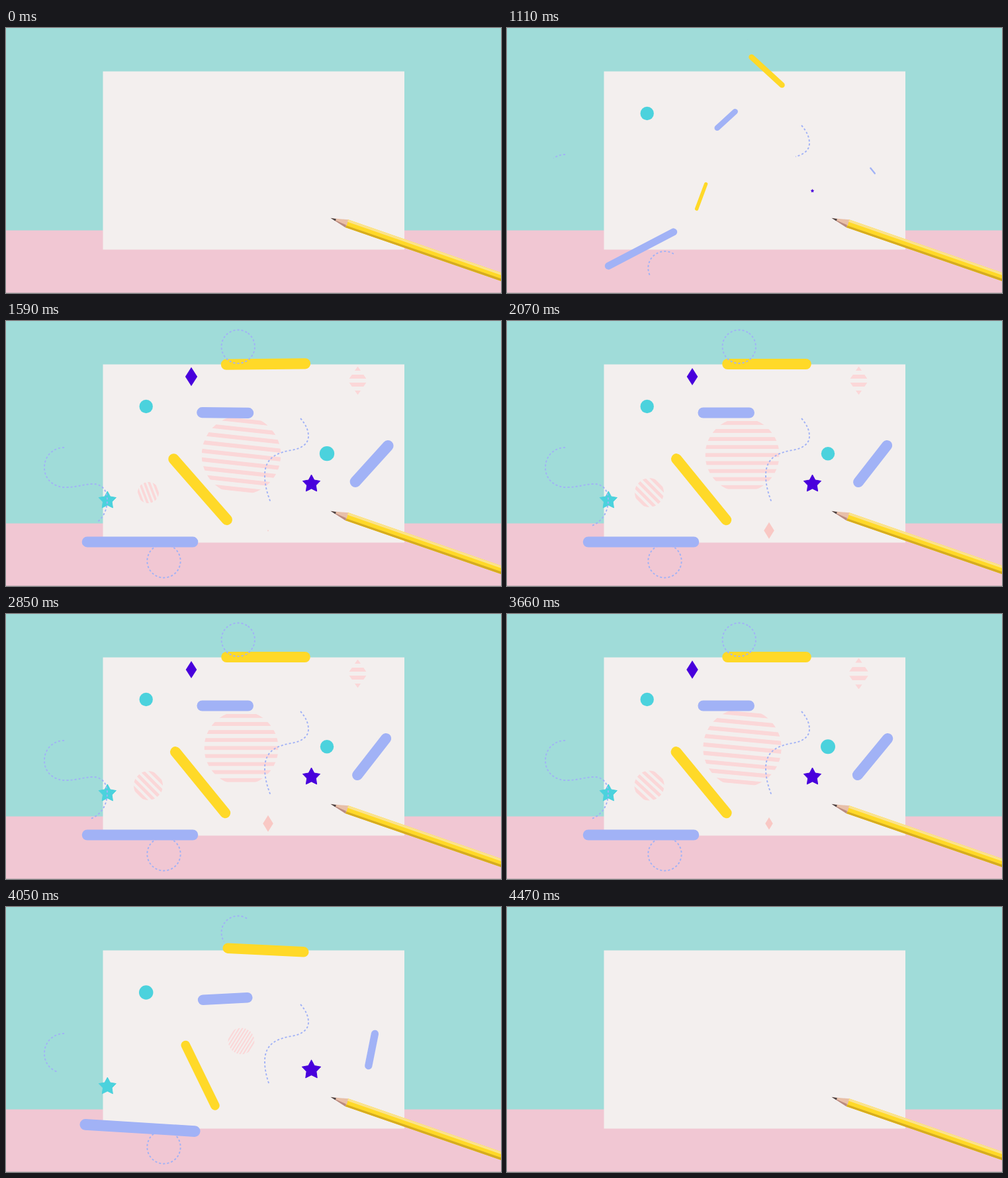
An HTML page that plays this animation: 748 px wide and 400 px high, repeating every 4.65 s.

```html
<!DOCTYPE html>
<html lang="en">
<head>
<meta charset="utf-8">
<title>Paper and pencil</title>
<style>
  html, body { margin: 0; width: 100%; height: 100%; overflow: hidden; }
  svg { display: block; width: 100vw; height: 100vh; }
</style>
</head>
<body>
<svg viewBox="0 0 748 400" preserveAspectRatio="none">
  <rect width="748" height="400" fill="#a0dcd9"/>
  <rect y="305.5" width="748" height="94.5" fill="#f1c7d3"/>
  <rect y="399" width="748" height="1" fill="#cdb4bc"/>
  <rect x="146.5" y="65.5" width="455.5" height="269" fill="#f3efee"/>
  <g id="confetti"></g>
  <g id="pencil">
    <path d="M516.5 289L748 369.3V382L512.8 301Z" fill="#ffd928"/>
    <path d="M516.5 289L748 369.3V373L515.6 292.5Z" fill="#fbe38c"/>
    <path d="M513.8 298L748 378.3V382L512.8 301Z" fill="#d6ac20"/>
    <path d="M491 287L517 289.3L515.5 296L512.8 301Z" fill="#e8bfa8"/>
    <path d="M491 287L514 297.6L512.8 301Z" fill="#b98a80"/>
    <path d="M490.5 286.8L499 288.2L497.5 291.3Z" fill="#494244"/>
  </g>
</svg>
<script>
const LOOP = 4650, STEP = 30, MIRROR = 5325;
const BLUE = '#a1b2f6', YELLOW = '#ffd928', TEAL = '#4bd2dd', PURPLE = '#4800dc', PINK = '#fbd7d8', CORAL = '#f9c8c4';

const root = document.getElementById('confetti');
const parts = [];
const clamp = v => Math.min(1, Math.max(0, v));

// Easings take the milliseconds since a part began.
function swing(ms) {
  if (ms <= 0) return 0;
  if (ms < 440) return 1.07 * Math.sin(Math.PI / 2 * ms / 440) ** 1.15;
  return 1 + 0.07 * Math.cos(Math.PI / 2 * clamp((ms - 440) / 320)) ** 4;
}
function pop(ms) {
  const u = clamp(ms / 400) - 1;
  return 1 + 2.70158 * u ** 3 + 1.70158 * u * u;
}
const smooth = x => (1 - Math.cos(Math.PI * clamp(x))) / 2;

function add(tag, attrs, parent = root) {
  const el = document.createElementNS('http://www.w3.org/2000/svg', tag);
  for (const key in attrs) el.setAttribute(key, attrs[key]);
  parent.appendChild(el);
  return el;
}

// A part grows from its centre and turns by `spin` degrees on the way.
function grow(x, y, start, ease, angle = 0, spin = 0) {
  const el = add('g', {});
  parts.push(t => {
    const s = ease(t - start);
    el.setAttribute('display', s > 0.005 ? 'inline' : 'none');
    el.setAttribute('transform', `translate(${x} ${y}) rotate(${angle + spin * (1 - s)}) scale(${s})`);
  });
  return el;
}

function bar(x, y, length, color, start, angle, spin) {
  add('rect', { x: -length / 2, y: -8, width: length, height: 16, rx: 8, fill: color },
    grow(x, y, start, swing, angle, spin));
}

function dot(x, y, r, start) {
  add('circle', { r, fill: TEAL }, grow(x, y, start, pop));
}

const rhombus = (w, h) => `M0 ${-h}L${w} 0L0 ${h}L${-w} 0Z`;

function diamond(x, y, w, h, color, start) {
  add('path', { d: rhombus(w, h), fill: color }, grow(x, y, start, pop));
}

function star(x, y, color, start) {
  const points = Array.from({ length: 10 }, (_, i) => {
    const r = i % 2 ? 7.2 : 13.8, a = i * Math.PI / 5;
    return [r * Math.sin(a), -r * Math.cos(a)];
  });
  add('polygon', { points: points.join(' '), fill: color, stroke: color, 'stroke-width': 1, 'stroke-linejoin': 'round' },
    grow(x, y, start, pop));
}

function stripes(group, id, outline, count, gap, thick) {
  const clip = add('clipPath', { id }, group);
  add('path', { d: outline }, clip);
  const lines = add('g', { 'clip-path': `url(#${id})`, fill: PINK }, group);
  for (let i = 0; i < count; i++) {
    const y = (i - (count - 1) / 2) * gap - thick / 2;
    add('rect', { x: -70, y, width: 140, height: thick }, lines);
  }
}
const disc = r => `M${-r} 0A${r} ${r} 0 0 1 ${r} 0A${r} ${r} 0 0 1 ${-r} 0Z`;

// A dotted line drawn from its first point onwards.
function trail(d, start, duration) {
  const el = add('path', { d, fill: 'none', stroke: BLUE, 'stroke-width': 1.9 });
  const total = el.getTotalLength(), dash = 3.1, gap = 3;
  parts.push(t => {
    const shown = total * smooth((t - start) / duration);
    const list = [];
    for (let at = 0; at < shown; at += dash + gap) list.push(Math.min(dash, shown - at), gap);
    list.push(0, total * 2);
    el.setAttribute('display', shown > 0 ? 'inline' : 'none');
    el.setAttribute('stroke-dasharray', list.join(' '));
  });
}
function ring(x, y, r, start) {
  const a = -58 * Math.PI / 180, dx = r * Math.cos(a), dy = r * Math.sin(a);
  trail(`M${x + dx} ${y + dy}A${r} ${r} 0 0 0 ${x - dx} ${y - dy}A${r} ${r} 0 0 0 ${x + dx} ${y + dy}`, start, 370);
}

stripes(grow(355.5, 202.3, 1165, swing, 0, -90), 'bigDisc', disc(56), 9, 12.1, 5.8);
stripes(grow(215, 259, 1506, pop, 45, 90), 'smallDisc', disc(22), 5, 9, 5);
stripes(grow(531.5, 90, 1442, pop), 'kite', rhombus(15, 21.5), 4, 12, 6);

ring(238.5, 362.3, 25.2, 947);
bar(202.5, 333.5, 175.5, BLUE, 898, 0, -90);
bar(392.5, 65, 134.5, YELLOW, 950, 0, 90);
bar(331.2, 138.5, 85.5, BLUE, 950, 0, -90);
bar(293.6, 254.2, 135, YELLOW, 1005, 50.8, 90);
bar(552.6, 215.5, 86, BLUE, 1060, -52, -90);
ring(350.7, 38.7, 25.2, 1107);

dot(211.7, 129, 10.2, 962);
dot(485, 200.2, 10.2, 1380);
diamond(280, 84, 8.3, 13, PURPLE, 1355);
diamond(396, 316.3, 7.8, 12.5, CORAL, 1580);
star(461.5, 245.8, PURPLE, 1092);
star(153.3, 270.8, TEAL, 1130);

trail('M88 191C70 191 58 205 58 221C58 239 72 251 90 251C108 251 118 246 132 246C145 246 153 256 153 270C153 288 144 303 128 309', 975, 720);
trail('M445 147C453 156 457 165 457 174C457 186 446 192 434 194.5C413 198 391 204 391 233C391 248 395 261 400 274', 958, 370);

function draw(time) {
  const now = Math.floor(time % LOOP / STEP) * STEP;
  const t = Math.min(now, MIRROR - now);
  for (const update of parts) update(t);
}

const begin = performance.now();
function tick() {
  draw(performance.now() - begin);
  requestAnimationFrame(tick);
}
tick();
</script>
</body>
</html>
```
